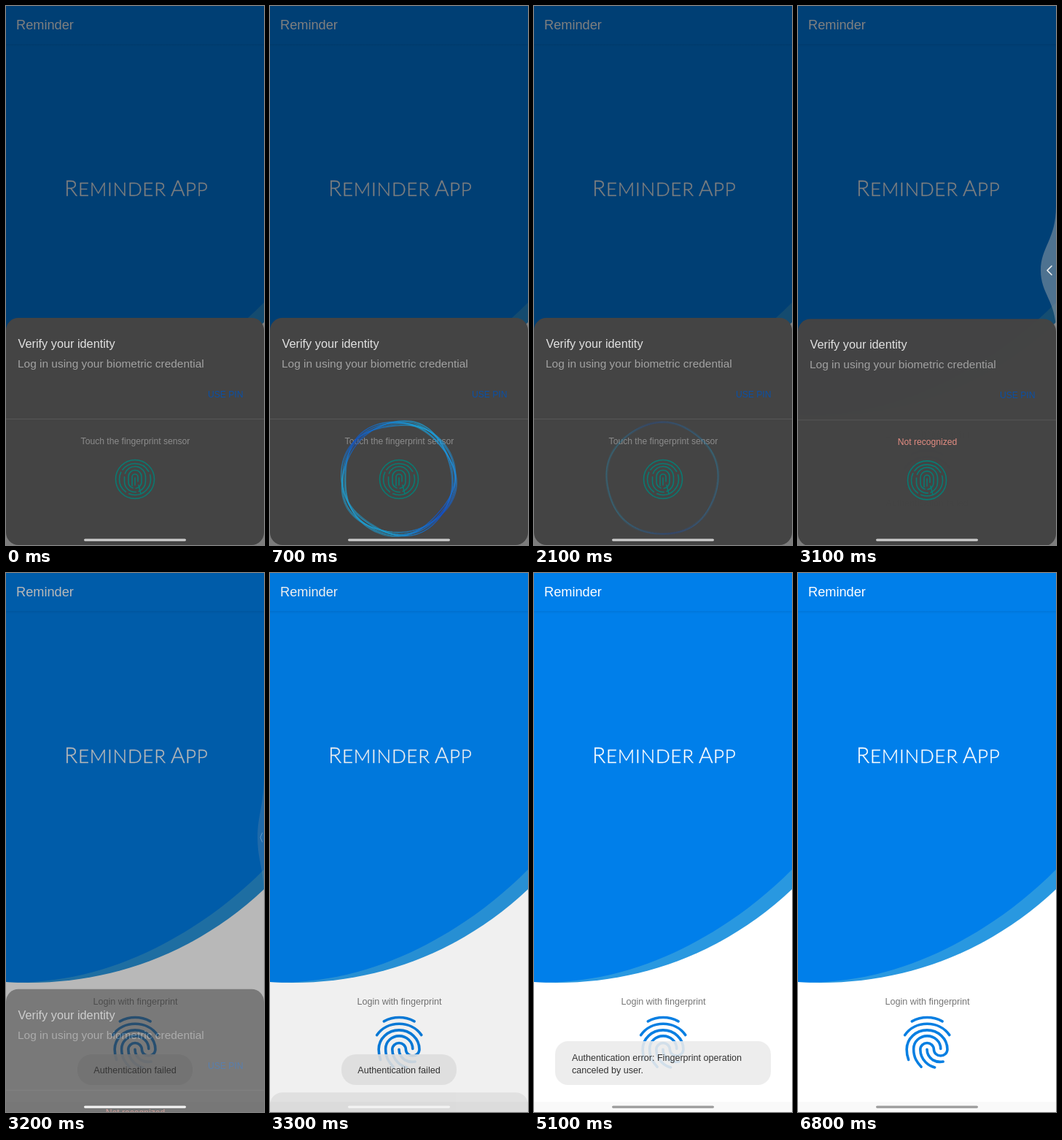
These frames come from a looping animation (354x738 px, 6900 ms). An HTML page with a canvas:

```html
<!DOCTYPE html>
<html lang="en">
<head>
<meta charset="utf-8">
<title>Reminder App</title>
<style>
  html, body { margin: 0; width: 100%; height: 100%; overflow: hidden; background: #fff; }
  svg, canvas { position: absolute; left: 0; top: 0; width: 100%; height: 100%; }
  text { font: 12.6px "Liberation Sans", Arial, sans-serif; }
  .logo { font: 300 26px Lato, sans-serif; fill: #fff; stroke: #fff; stroke-width: .35; letter-spacing: .7px; }
  .logo .cap { font-size: 30px; }
  .lines { fill: none; stroke-linecap: round; stroke-linejoin: round; }
  .toast rect { fill: #ebebeb; fill-opacity: .89; }
  .toast text { fill: #333; }
</style>
</head>
<body>
<svg viewBox="0 0 354 738" preserveAspectRatio="none">
  <defs>
    <linearGradient id="shade" x2="0" y2="1">
      <stop stop-opacity=".07"/>
      <stop offset="1" stop-opacity="0"/>
    </linearGradient>
  </defs>

  <!-- Login screen -->
  <rect width="354" height="738" fill="#fff"/>
  <path d="M0 0V560C130 568 255 526 354 433V0Z" fill="#2998e0"/>
  <path d="M0 0V560C130 566 260 500 354 406V0Z" fill="#007fea"/>
  <rect y="52" width="354" height="4" fill="url(#shade)"/>
  <text x="14" y="32" fill="#fff" style="font-size:18.2px">Reminder</text>
  <text class="logo" y="260"><tspan class="cap" x="80">R</tspan><tspan x="99">EMINDER</tspan><tspan class="cap" x="226">A</tspan><tspan x="246">PP</tspan></text>
  <text x="177.5" y="590.5" text-anchor="middle" fill="#777">Login with fingerprint</text>
  <g class="lines" stroke="#087fe2" transform="translate(134 599.5) scale(3.6)">
    <path d="M6.2 3.97Q9 2.5 12 2.5T17.8 3.97M3.5 9.22C7.5 3.5 16.5 3.5 20.5 9.2"/>
    <path d="M9.75 21.29C8.9 20.4 8.4 19.9 7.8 18.7C7.2 17.6 6.84 16.1 6.84 14.44A5.16 4.89 0 0 1 17.16 14.44"/>
    <path d="M11.94 14.66C11.94 16.2 12.75 17.7 14.1 18.64C15 19.2 16.2 19.6 18.1 19.3"/>
    <path d="M14.91 21.5C13.4 21.1 12.4 20.5 11.4 19.5C10.1 18.2 9.39 16.5 9.39 14.66A2.58 2.44 0 0 1 14.55 14.66A2.58 2.44 0 0 0 19.71 14.66A7.75 7.33 0 0 0 4.21 14.66C4.2 16 4.4 17.2 4.9 18.6"/>
  </g>
  <rect y="724" width="354" height="14" fill="#f9f9f9"/>

  <g class="toast" id="failedToast">
    <rect x="98" y="659" width="158" height="42" rx="20"/>
    <text x="177" y="685" text-anchor="middle">Authentication failed</text>
  </g>
  <g class="toast" id="errorToast">
    <rect x="29" y="641" width="296" height="60" rx="18"/>
    <text x="52" y="668">Authentication error: Fingerprint operation</text>
    <text x="52" y="685">canceled by user.</text>
  </g>

  <rect id="dim" width="354" height="738"/>

  <!-- Back gesture -->
  <g id="backHandle">
    <path d="M0 -88C0 -42 -21 -32 -21 0S0 42 0 83Z" fill="#96a0aa" fill-opacity=".52"/>
    <path class="lines" d="M-6 -6L-12 0L-6 6" stroke="#f2f2f2" stroke-width="1.6"/>
  </g>

  <!-- Biometric sheet -->
  <g id="sheet">
    <rect y="427" width="354" height="311" rx="17" fill="#444"/>
    <text x="16.5" y="468" fill="#e2e2e2" style="font-size:16.3px">Verify your identity</text>
    <text x="16" y="495" fill="#a2a2a2" style="font-size:15.45px">Log in using your biometric credential</text>
    <text x="277" y="536" fill="#0b50a6" style="font-size:12.1px">USE PIN</text>
    <path d="M0 565.5H354" stroke="#575757"/>
    <text id="hint" x="177.5" y="600" text-anchor="middle" style="font-size:12.15px"></text>
    <g class="lines" stroke="#0a7a72" stroke-width="1.6" transform="translate(177 648)">
      <circle r="26.5"/>
      <circle r="21.5" stroke-dasharray="42 5 30 4"/>
      <rect x="-14.5" y="-17.5" width="29" height="35" rx="14.5" stroke-dasharray="46 4 30 5"/>
      <rect x="-9" y="-12.5" width="18" height="25" rx="9" stroke-dasharray="34 4"/>
      <path d="M-4 9V-3A4 4 0 0 1 4 -3V3M0 -2V8M5 8L8 20"/>
    </g>
  </g>
  <rect id="navPill" x="107" y="729.5" width="140" height="3.2" rx="1.6"/>
</svg>
<canvas id="ring" width="354" height="738"></canvas>

<script>
const LOOP = 6900;
const TAU = Math.PI * 2;
const el = id => document.getElementById(id);
const ctx = el('ring').getContext('2d');

// 0 before start, 1 after end, linear between
const ramp = (t, start, end) => Math.min(1, Math.max(0, (t - start) / (end - start)));

const RING_COLORS = [
  [0, '#1c86dc'], [.11, '#0d4fd2'], [.27, '#18a0d8'], [.5, '#1e9fd2'],
  [.61, '#1052c4'], [.81, '#17a9e2'], [1, '#1c86dc']
];

function drawRing(t) {
  ctx.clearRect(0, 0, 354, 738);
  const alpha = ramp(t, 100, 400) * (1 - .25 * ramp(t, 1100, 1600)) * (1 - ramp(t, 1650, 2180));
  if (!alpha) return;

  const time = t / 1000;
  const radius = 70 + 6.5 * ramp(t, 100, 450);
  const spread = 1 - .65 * ramp(t, 1000, 1600);
  const gradient = ctx.createConicGradient((time - .7) * .5, 0, 0);
  RING_COLORS.forEach(([at, color]) => gradient.addColorStop(at, color));

  ctx.save();
  ctx.translate(176, 647);
  ctx.strokeStyle = gradient;
  ctx.globalAlpha = alpha * .55;
  ctx.lineWidth = 1.2;
  for (let strand = 0; strand < 10; strand++) {
    const phase = strand * .67;
    ctx.beginPath();
    for (let i = 0; i < 120; i++) {
      const a = i / 120 * TAU;
      const r = radius
        + spread * 2.4 * Math.sin(3 * a + phase + time * 2.2)
        + spread * 1.5 * Math.sin(2 * a - phase * 1.9 - time * 1.6)
        + .8 * Math.sin(5 * a + time * 1.4);
      ctx.lineTo(r * Math.cos(a), r * Math.sin(a));
    }
    ctx.closePath();
    ctx.stroke();
  }
  ctx.restore();
}

function render(t) {
  const exit = ramp(t, 3100, 3320);
  el('sheet').setAttribute('transform', `translate(0 ${311 * exit})`);
  el('sheet').setAttribute('opacity', 1 - exit);
  el('dim').setAttribute('opacity', .5 * (1 - ramp(t, 3100, 3328)));

  const rejected = t >= 2200;
  el('hint').textContent = rejected ? 'Not recognized' : 'Touch the fingerprint sensor';
  el('hint').setAttribute('fill', rejected ? '#e58d82' : '#8c8c8c');

  const pull = ramp(t, 2930, 3080) * (1 - ramp(t, 3120, 3260));
  el('backHandle').setAttribute('transform', `translate(354 362) scale(${pull} 1)`);
  el('backHandle').setAttribute('opacity', pull);

  el('failedToast').setAttribute('opacity', ramp(t, 2200, 2500) * (1 - ramp(t, 3850, 4100)));
  el('errorToast').setAttribute('opacity', ramp(t, 4150, 4500) * (1 - ramp(t, 6050, 6400)));
  el('navPill').setAttribute('fill', t < 3150 ? '#cbcbcb' : t < 3400 ? '#f3f3f3' : '#9c9c9c');
  drawRing(t);
}

function tick() {
  render(performance.now() % LOOP);
  requestAnimationFrame(tick);
}
tick();
</script>
</body>
</html>
```
